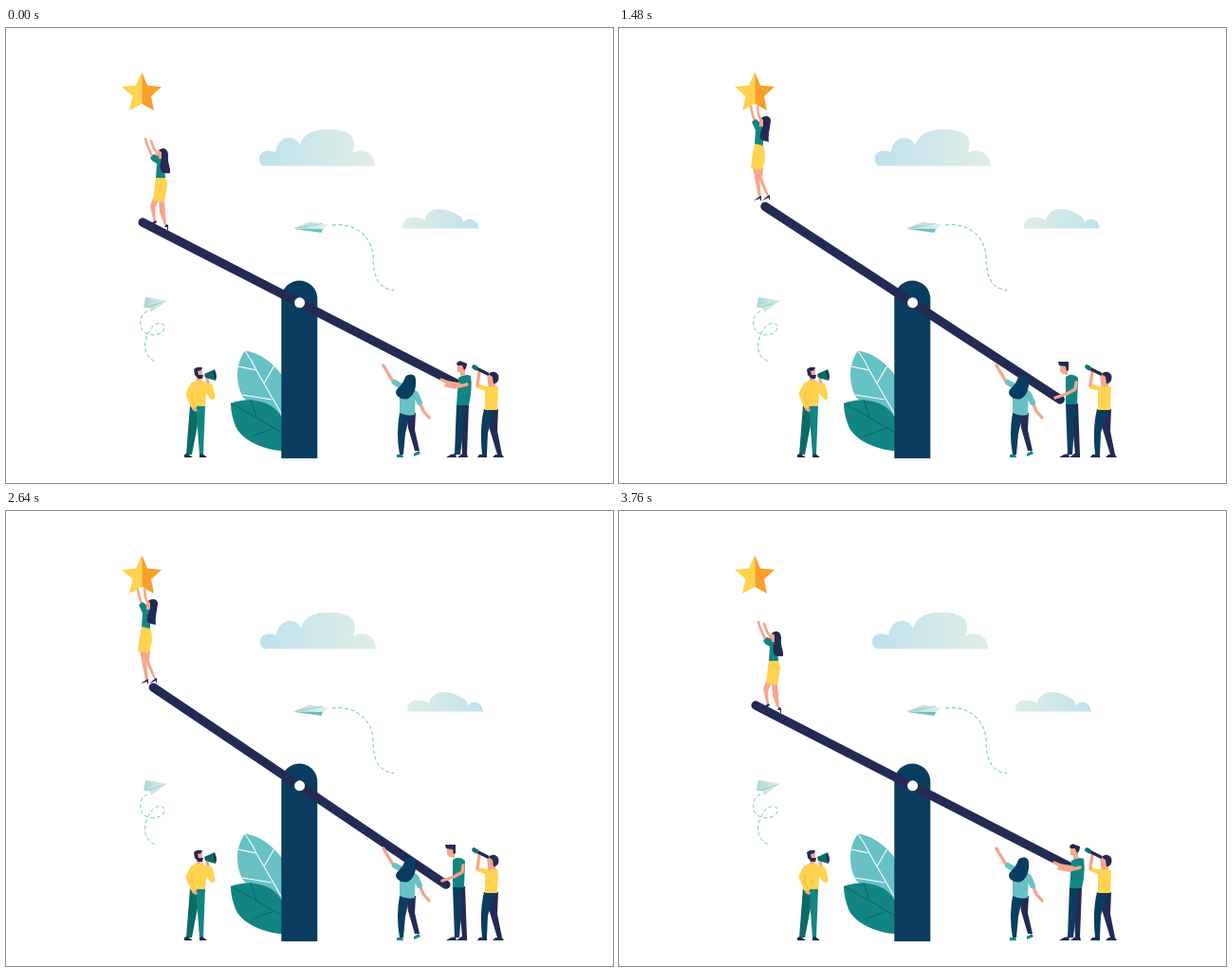
Write an HTML page that moves like this. It is 640 px wide and 480 px high and loops after 3800 ms.

```html
<!DOCTYPE html>
<html lang="en">
<head>
<meta charset="utf-8">
<style>
html, body { margin: 0; width: 100%; height: 100%; overflow: hidden; background: #fff }
svg { display: block; width: 640px; height: 480px }
.navy { fill: #232a54 } .blue { fill: #0a3d5f } .teal { fill: #128583 } .aqua { fill: #68c1c5 }
.yellow { fill: #ffd250 } .skin { fill: #f5a68b } .pine { fill: #0b6b66 } .orange { fill: #f6a02a }
.line { fill: none; stroke-width: 3.4; stroke-linecap: round; stroke-linejoin: round }
.flesh { stroke: #f5a68b } .thin { stroke-width: 2.6 }
.sleeve { stroke-width: 6 }
.trail { fill: none; stroke: #74c4c5; stroke-width: 1; stroke-dasharray: 4 2.6 }
.vein { fill: none; stroke: #fff; stroke-width: 1.1 }
</style>
</head>
<body>
<svg viewBox="0 0 640 480">
  <defs>
    <linearGradient id="sky"><stop stop-color="#bfe1ec"/><stop offset="1" stop-color="#dfeee6"/></linearGradient>
    <linearGradient id="mist"><stop stop-color="#dfeee6"/><stop offset="1" stop-color="#bfe1ec"/></linearGradient>
    <linearGradient id="wing"><stop stop-color="#a9d6d4"/><stop offset="1" stop-color="#e6f2f0"/></linearGradient>
  </defs>

  <path id="cloud1" fill="url(#sky)" d="M271 145.5C265 142 265 130 276 129.5Q281 129 284 131C286 119 294 115 301 116Q307 117 310 124C314 110 326 107 341 107C360 107 368 114 367 123Q367 128 365 132C370 129 378 129 383 132Q389 137 389 145.5Z"/>
  <path id="cloud2" fill="url(#mist)" d="M418 211.5C418 204 422 200 427 200Q436 199 441 203C443 195 449 191 456 191C466 191 472 195 479 199Q481 201 482 205C484 202 488 201 491 202Q498 204 498 211.5Z"/>

  <path class="trail" d="M344 208C365 205 385 217 387 240C387 260 391 275 409 276.5M149 299C141 301 139 316 146 321C153 326 166 324 167 316C167 309 156 310 151 320C146 328 142 346 158 352"/>
  <path fill="url(#wing)" d="M303 211.5L321 204.5L340 207.5L334 213Z"/>
  <path class="aqua" d="M304 212L334 212L332.500 216Z"/>
  <path fill="none" stroke="#8fcfcf" stroke-width=".8" d="M305 211.500L334 206"/>
  <path fill="url(#wing)" d="M147 284L170 287.5L145 295Z"/>
  <path fill="#cbe6e5" d="M150 292L170 287.5L153 300Z"/>
  <path fill="#9dd0bd" d="M145 295L170 287.5L151 295Z"/>

  <path class="yellow" d="M143.300 46.500L137 60.500L122 62L133.500 72L130 87L143.300 80Z"/>
  <path class="orange" d="M143.300 46.500L149 60.500L164 62L153 72L156 87L143.300 80Z"/>

  <path class="aqua" d="M252 340.5C270 343 285 357 292 368V409C275 402 258 401 249 388C241 372 243 352 252 340.5Z"/>
  <path class="vein" d="M252 341Q259 350 264 361L291 408M264 361L245 357M272 375L283 356M280 392L249 387"/>
  <path class="teal" d="M237 396C255 389 282 392 292 413V446C270 445 248 434 242 420Q237 407 237 396Z"/>
  <path class="vein" style="stroke:#0b6b6e" d="M237 396L264 411L291 427M258 392L264 411M258 431L283 422"/>

  <path class="blue" d="M290.300 454V285.500a19 19 0 0 1 38 0V454Z"/>
  <line id="beam" x1="-186" x2="186" stroke="#232a54" stroke-width="9.4" stroke-linecap="round"/>
  <circle cx="309.6" cy="289.8" r="5.5" fill="#fff"/>

  <!-- caller with megaphone -->
  <path class="pine" d="M194 398H206L196 450H190Z"/>
  <path class="teal" d="M200 398H210L208 450H204Z"/>
  <path class="navy" d="M188 453V450L191 449L197 453ZM204 453V450L207 449L212 453Z"/>
  <path class="yellow" d="M199 372Q209 369 212 377L210 399H194L195 378Z"/>
  <path class="line sleeve" stroke="#ffd250" d="M197 377L192.500 386L198 399M209 377L217.500 389L215 378"/>
  <path class="line" stroke="#e2b43e" style="stroke-width:.7" d="M196 383V392L200 399"/>
  <path class="line flesh" d="M198 402L200 403M213 374L212 371"/>
  <path class="skin" d="M200 361H207V368L205 372H201Z"/>
  <path class="navy" d="M198 360Q201 357 207 358L206 361L202 362L203 366L208 366L207 370H203L199 366Z"/>
  <path class="pine" d="M209 365L220 360Q223 366 221 372L210 369Z"/>
  <path class="navy" d="M219 361Q223 366 221 371Q218 366 219 361Z"/>

  <!-- waving woman -->
  <path class="navy" d="M422 406H432L431 424L436 446H431L424 422Z"/>
  <path class="blue" d="M415 406H426L421 428L419 450H415Q411 428 415 406Z"/>
  <path class="teal" d="M412 453V450H418L419 453ZM430 452V449L435 446L437 449Z"/>
  <path class="line flesh" d="M398 356L402 363L408 373M437 397L440 404L446 411"/>
  <path class="line sleeve" stroke="#68c1c5" d="M410 374L419 379M432 386L436 395"/>
  <path class="aqua" d="M415 378L432 382L431 408Q423 410 415 406Z"/>
  <path class="blue" d="M421 368C425 364 432 365 432 371C433 379 430 388 424 391C418 393 411 389 411 384C412 379 418 378 421 368Z"/>

  <!-- lookout -->
  <path class="navy" d="M510 402H519L518 425L523 450H518L509 420Z"/>
  <path class="blue" d="M504 402H516L508 427L507 450H502Q499 423 504 402Z"/>
  <path class="navy" d="M497 453L499 450H507V453ZM513 453L516 450H523L525 453Z"/>
  <path class="yellow" d="M505 379L512 376L519 379L518 403H505Z"/>
  <path class="line sleeve" stroke="#ffd250" style="stroke-width:5" d="M507 381L498 378"/>
  <path class="line flesh" d="M497 377L499 363M510 377L509 368"/>
  <path class="skin" d="M509 366H517L516 378H511Z"/>
  <path class="navy" d="M510 364C514 361 520 364 519.500 369Q519 375 514 375L513 368L510 366Z"/>
  <path class="line" stroke="#232a54" d="M494 358L508 365"/>
  <path class="line" stroke="#0f6f70" style="stroke-width:4.600" d="M493.500 357.500L496 359"/>

  <!-- pusher -->
  <g data-pose="pusher0">
    <path class="navy" d="M479 397H488L486 450H481Z"/>
    <path class="blue" d="M475 397H485L479 450H473Z"/>
    <path class="navy" d="M464 453L469 450L474 449L475 453ZM476 453L481 449H486L487 453Z"/>
    <path class="teal" d="M477 369Q484 364 490 367Q492 380 488 398H475Z"/>
    <path class="line flesh" d="M459 371L466 374L478 376M464 377L474 379L486 376"/>
    <path class="skin" d="M476 356H484V366L479 367V363H476Z"/>
    <path class="navy" d="M475 354Q477 350 481 352L486 354Q486 359 483 361L481 356H476Z"/>
  </g>
  <g data-pose="pusher1">
    <path class="navy" d="M476 396H484L486 450H481Z"/>
    <path class="blue" d="M471 396H482L478 450H473Z"/>
    <path class="navy" d="M464 453L469 450L474 449L475 453ZM475 453L480 449H486V453Z"/>
    <path class="teal" d="M471 368Q478 363 484 369L483 397H471Z"/>
    <path class="line flesh" d="M482 374L481 381L472 386L460 390"/>
    <path class="skin" d="M465 356H473V366L468 365L465 362Z"/>
    <path class="navy" d="M463 352H474V361L472 362L471 357L464 356Z"/>
  </g>
  <g data-pose="pusher2">
    <path class="navy" d="M467 395H476L478 425L484 450H480L468 420Z"/>
    <path class="blue" d="M463 395H474L476 450H470Z"/>
    <path class="navy" d="M464 453L469 450L474 449L475 453ZM475 453L480 449L485 448L486 453Z"/>
    <path class="teal" d="M459 367Q469 362 478 369L475 396H462Q462 380 459 367Z"/>
    <path class="line flesh" d="M477 375L470 384L456 390"/>
    <path class="skin" d="M451 359L458 358L461 366L455 367Z"/>
    <path class="navy" d="M447 357L453 354L457 356L459 362L456 363L455 359L449 362Z"/>
  </g>

  <!-- woman at the star -->
  <g data-pose="jumper0">
    <path class="skin" d="M155 179H162L157 190L158 205H156L152 188ZM161 182H167L169 208H167L162 195Z"/>
    <path class="navy" d="M151 207L158 203L159 205L156 207ZM167 210L169 207L171 208V213H170V210Z"/>
    <path class="yellow" d="M158 156H168L170 166L167 184L155 182Z"/>
    <path class="line flesh thin" d="M147 117L149 124L155 137M153 119L156 127L161 135"/>
    <path class="teal" d="M152 137L156 133L166 138L168 158H158L159 143L154 140Z"/>
    <path class="skin" d="M160 129H166V138H161Z"/>
    <path class="navy" d="M161 129C165 125 171 127 171 134C170 142 174 148 173 153Q169 154 164 152Q161 147 164 138V131Z"/>
  </g>
  <g data-pose="jumper1">
    <path class="skin" d="M153 145H159L158 176H155ZM157 145H164L164 158L168 175H166L159 160Z"/>
    <path class="navy" d="M151 179L157 175L158 179H157V178ZM160 179L166 175L168 174V178H167V177Z"/>
    <path class="yellow" d="M153 119H162Q169 132 165 146H152Q151 133 153 119Z"/>
    <path class="line flesh thin" d="M139 83L143 92L149 100M145 83L149 91L155 98"/>
    <path class="teal" d="M145 98L149 95L161 101L162 120H153L152 107Z"/>
    <path class="skin" d="M153 92H159V101H154Z"/>
    <path class="navy" d="M154 91C158 88 164 89 164 96C163 104 168 109 167 115Q162 116 157 114Q155 108 158 100V93Z"/>
  </g>
  <g data-pose="jumper2 jumper3">
    <g data-pose="jumper2">
      <path class="skin" d="M141 147H147L150 179H147ZM146 147H152L151 158L158 177H156L149 163Z"/>
      <path class="navy" d="M142 182L148 178L150 177V182H149V180ZM151 182L157 177L159 176V181H158V179Z"/>
    </g>
    <g data-pose="jumper3">
      <path class="skin" d="M140 147H147L144 164L141 179H139ZM143 147H150L149 163L150 178H147L143 161Z"/>
      <path class="navy" d="M133 180L139 178L142 177V182H141V180ZM143 182L148 178L151 177V182H150V180Z"/>
    </g>
    <path class="yellow" d="M143 122L152 123Q157 137 150 150L139 148Q140 134 143 122Z"/>
    <path class="line flesh thin" d="M139 83L141 92L144 101M146 83L147 91L150 98"/>
    <path class="teal" d="M140 99L144 96L152 102V124L143 122L144 108Z"/>
    <path class="skin" d="M148 95H154L152 104H148Z"/>
    <path class="navy" d="M150 95C153 92 160 92 160 98C159 106 157 113 158 120Q153 120 149 117Q148 111 152 103V97Z"/>
  </g>
</svg>
<script>
const LOOP = 3800, SWING = 1880;
const el = id => document.getElementById(id);
const posed = [...document.querySelectorAll('[data-pose]')];

// keys are [time, value] pairs
const step = (keys, t) => keys.filter(k => k[0] <= t).pop()[1];
const tween = (keys, t) => {
  const i = Math.max(1, keys.findIndex(k => k[0] >= t));
  const [t0, a] = keys[i - 1], [t1, b] = keys[i];
  return a + (b - a) * (t - t0) / (t1 - t0);
};

const angle = [[0, 27.2], [260, 27.2], [340, 33.2], [720, 33.2], [800, 34.7], [1060, 34.7], [1140, 33.2], [1520, 33.2], [1600, 27.2], [SWING, 27.2]];
const pusher = [[0, 0], [320, 1], [780, 2], [1100, 1], [1560, 0]];
const jumper = [[0, 0], [320, 1], [1000, 2], [1560, 3], [2320, 2], [2800, 3], [3080, 1], [3520, 0]];
const drift1 = [[0, 0], [900, 3], [1480, 2.6], [2640, 1], [3360, .3], [LOOP, 0]];
const drift2 = [[0, .2], [800, 5], [1480, 8.8], [1680, 9.2], [1880, 8.6], [2640, 5], [3360, 1], [LOOP, -.5]];

function draw() {
  const t = performance.now() % LOOP, s = t % SWING;
  el('beam').setAttribute('transform', `translate(309.6 290.1) rotate(${tween(angle, s)})`);
  el('cloud1').setAttribute('transform', `translate(${tween(drift1, t)})`);
  el('cloud2').setAttribute('transform', `translate(${tween(drift2, t)})`);
  const active = ['pusher' + step(pusher, s), 'jumper' + step(jumper, t)];
  for (const g of posed) g.style.display = active.some(p => g.dataset.pose.includes(p)) ? '' : 'none';
  requestAnimationFrame(draw);
}
draw();
</script>
</body>
</html>
```
